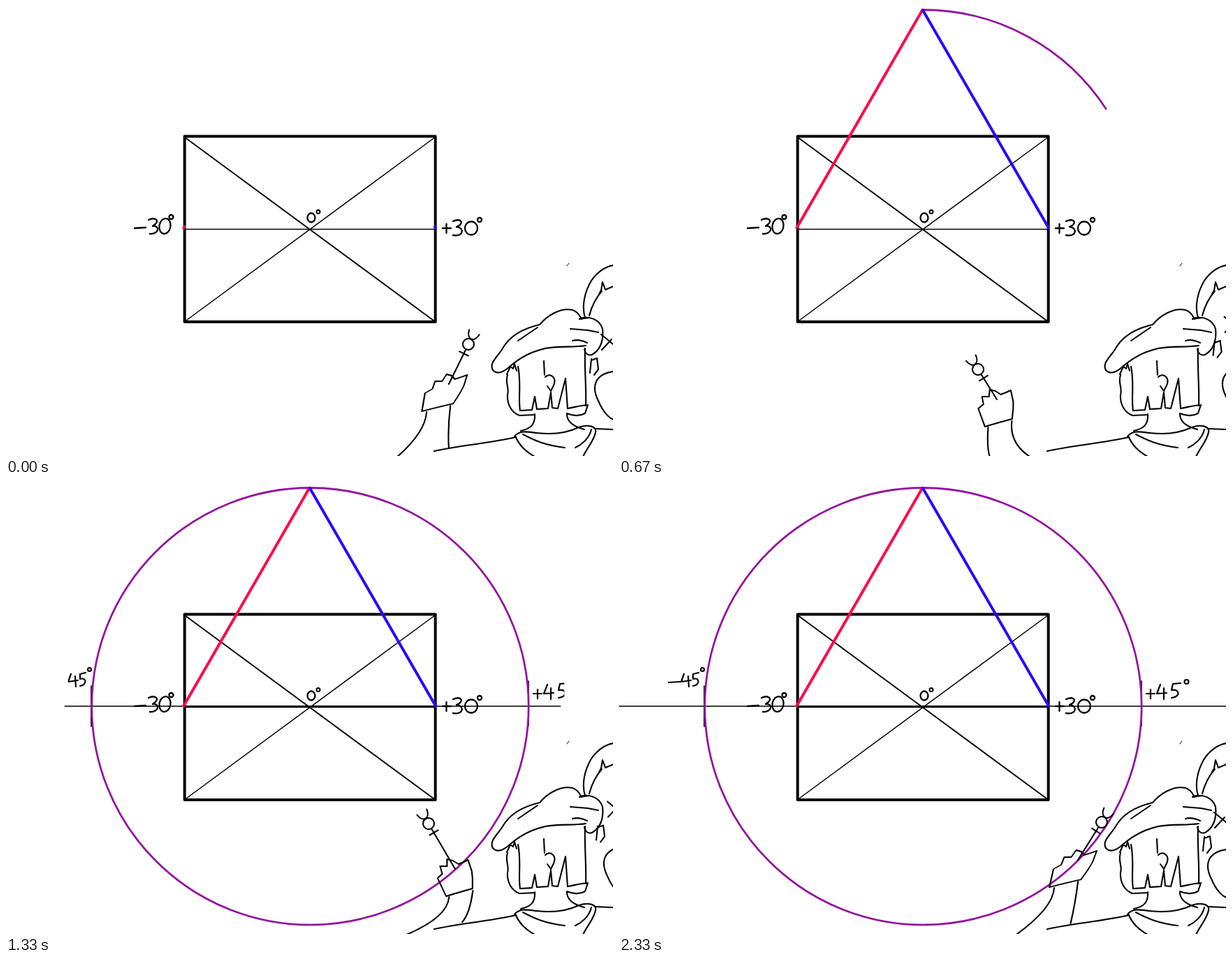
Write an HTML page that moves like this. It is 869x644 px and loops after 2500 ms.

```html
<!DOCTYPE html>
<html lang="en">
<head>
<meta charset="utf-8">
<title>Angles in a circle of view</title>
<style>
  html, body { margin: 0; width: 100%; height: 100%; overflow: hidden; background: #fff; }
  svg { display: block; width: 100%; height: 100%; fill: none; stroke: #000; stroke-linecap: round; stroke-linejoin: round; }
</style>
</head>
<body>
<svg viewBox="0 0 869 644">
  <defs>
    <clipPath id="axisClip"><rect id="axisWipe" y="0" height="644"/></clipPath>
    <clipPath id="labelClip"><rect id="labelWipe" y="0" height="644"/></clipPath>
  </defs>

  <!-- Picture plane -->
  <path stroke-width="1.5" d="M256 451.5 614 188M255 319.5H615"/>
  <path stroke-width="1.9" d="M256 188 614 451.5"/>
  <rect x="255.7" y="186.5" width="359" height="265.5" stroke-width="4"/>
  <g stroke-width="2.3">
    <g aria-label="-30°">
      <path d="M184 318 200 317M204 306C212 302 220 306 214 312L210 315C221 314 219 327 206 326"/>
      <ellipse cx="227.5" cy="315" rx="8" ry="11" transform="rotate(10 227.5 315)"/>
      <circle cx="236.5" cy="302" r="3"/>
    </g>
    <g aria-label="+30°">
      <path d="M625 318H637M630.5 312V325M640 308C649 304 656 308 649 314L645 316C657 317 655 331 640 328"/>
      <ellipse cx="666" cy="318" rx="9" ry="9.5"/>
      <circle cx="678" cy="306" r="3"/>
    </g>
    <g aria-label="0°">
      <ellipse cx="437" cy="303" rx="5.5" ry="6.5"/>
      <circle cx="447" cy="294.5" r="2.5" stroke-width="2"/>
    </g>
  </g>

  <!-- Growing construction -->
  <g clip-path="url(#axisClip)">
    <path stroke-width="1.7" d="M0 318H869M122 289V347M748 282V346"/>
    <path stroke-width="2.8" d="M256 318.5H614"/>
  </g>
  <g clip-path="url(#labelClip)" stroke-width="2.2">
    <g aria-label="-45°">
      <path d="M71 284 87 283M93 272 89 283 103 281M99 275 100 290M114 270 106 272 106 279C116 276 116 288 106 289"/>
      <circle cx="119.5" cy="265.5" r="2.5"/>
    </g>
    <g aria-label="+45°">
      <path d="M755 300H767M761 294V307M775 287 770 300 784 299M780 292V308M804 285 793 286 791 295C802 292 805 305 791 306"/>
      <circle cx="812.5" cy="283" r="3"/>
    </g>
  </g>
  <circle id="ring" pathLength="100" cx="435.5" cy="318.2" r="312.7" transform="rotate(-90 435.5 318.2)"
          stroke="#93169f" stroke-width="2.8" stroke-linecap="butt"/>
  <path id="red" pathLength="100" stroke="#ff0a4b" stroke-width="4" d="M254.5 317.5 434.5 5.5"/>
  <path id="blue" pathLength="100" stroke="#2a08ff" stroke-width="4" d="M615 317.5 435 6"/>

  <!-- Painter seen from behind -->
  <g stroke-width="2.1">
    <path stroke-width="1" d="M803 372 806 368"/>
    <g id="feather">
      <path d="M829 446C824 430 828 410 838 393C848 379 858 373 870 371M835 443C839 428 846 416 853 408M849 412 852 407 854 395 858 406 870 401"/>
    </g>
    <g id="hat">
      <path d="M697 521C691 511 704 502 711 490C722 471 742 461 764 456C774 444 793 431 811 435C820 438 822 445 824 448M733 479 761 460"/>
      <path d="M697 521C703 528 712 524 720 517C737 502 752 495 772 490C792 486 812 489 830 486M822 447C836 443 850 449 854 462C856 480 850 493 839 499C833 501 829 497 828 491"/>
      <path d="M808 462 833 464 848 467M811 479C818 477 826 479 832 482M821 448 835 446"/>
    </g>
    <g id="head">
      <path d="M733 516C738 540 733 560 736 579L753 578 757 559 760 577 776 576 780 553 782 575 790 576 801 533 804 576M829 490C828 520 831 545 830 572"/>
      <path d="M770 508 771 528M772 531C779 524 789 532 784 543L780 551 775 544"/>
      <path d="M717 527 722 516 726 519 728 512 731 522M718 528C714 540 721 546 718 556C717 570 724 582 735 586L757 585M804 576C815 574 825 571 833 571L829 583C820 588 810 586 803 583"/>
    </g>
    <g id="shoulders">
      <path d="M757 584C758 600 750 605 737 608M803 584C803 595 813 602 828 606M845 605 870 606M730 617C690 626 650 629 613 637"/>
      <path d="M728 616C735 606 750 610 760 611C785 614 803 611 820 603C834 598 846 602 844 610C842 622 832 632 826 645M729 615C735 630 745 638 757 645M740 613C757 622 773 629 800 632M838 606C835 619 824 628 815 632"/>
    </g>
    <path id="farHand" d="M852 470 869 484M853 492 867 477M838 505 836 525M838 507 846 504 848 520 842 528"/>
    <path id="farArm" d="M870 523C842 527 838 545 848 565C855 582 864 590 870 592"/>
    <path id="hand" d="M-21 4-28-22-20-28-21-39-11-39-9-49-1-47 6-42 14-45 21-48 23-32 22-22 19-7Q3-3-21 4"/>
    <path id="forearm"/>
    <path id="wand"/>
    <path id="symbol" d="M-8-19C-6-5 6-5 8-19M-8 0A8 8 0 1 1 8 0A8 8 0 1 1-8 0M-7 15H7"/>
  </g>
</svg>
<script>
const el = id => document.getElementById(id);
const set = (id, name, value) => el(id).setAttribute(name, value);
const FPS = 24, LOOP = 2500, DRAWING = 4;

// Path of the wand: where it is gripped and where its round head is.
const keys = [
  { at: 0, grip: [634, 541], head: [662, 484] },
  { at: 8, grip: [578, 558], head: [590, 497] },
  { at: 16, grip: [541, 563], head: [514, 520] },
  { at: 20, grip: [571, 552], head: [513, 508] },
  { at: 32, grip: [643, 551], head: [605, 486] },
  { at: 40, grip: [681, 582], head: [677, 515] },
  { at: 56, grip: [657, 538], head: [691, 484] },
];
keys.push({ ...keys[0], at: 60 });

const ease = (frame, from, to) => {
  const s = Math.min(1, Math.max(0, (frame - from) / (to - from)));
  return s * s * (3 - 2 * s);
};
const mix = (a, b, k) => a.map((v, i) => v + (b[i] - v) * k);

function drawPainter(frame) {
  const next = keys.findIndex(key => key.at > frame), a = keys[next - 1], b = keys[next];
  const k = (frame - a.at) / (b.at - a.at);
  const [gx, gy] = mix(a.grip, b.grip, k), [hx, hy] = mix(a.head, b.head, k);
  const dx = hx - gx, dy = hy - gy, length = Math.hypot(dx, dy);
  set('wand', 'd', `M${gx} ${gy}L${hx - dx * 8 / length} ${hy - dy * 8 / length}`);
  set('symbol', 'transform', `translate(${hx} ${hy}) rotate(${Math.atan2(dx, -dy) * 180 / Math.PI})`);

  // The hand leans with the wand; the forearm trails behind the wrist.
  const lean = 6 + 0.35 * dx, x = gx - lean, y = gy + 35;
  set('hand', 'transform', `matrix(1 0 ${-lean / 36} 1 ${x} ${y})`);
  set('forearm', 'd',
    `M${x - 16} ${y + 5}Q${x - 18} ${y + 34} ${313 + 0.4 * x} 645` +
    `M${x + 18} ${y - 4}Q${x + 14} ${y + 28} ${263 + 0.6 * x} ${744 - 0.18 * x}`);

  const swing = 22 * Math.max(0, Math.sin(Math.PI * frame / 40));
  set('farArm', 'transform', `translate(${swing} ${-swing * 0.3})`);
  set('farHand', 'transform', `translate(${swing * 0.7} ${-swing * 1.2})`);
}

const grow = (id, part) => set(id, 'stroke-dasharray', `${part * 100.2} 200`);
function wipe(id, centre, half) {
  set(id, 'x', centre - half);
  set(id, 'width', 2 * half);
}

function draw() {
  const time = performance.now() % LOOP;
  const frame = Math.floor((time + 4) * FPS / 1000) % 60;
  const sides = ease(frame, -0.5, 10.9);
  grow('red', sides);
  grow('blue', sides);
  grow('ring', ease(frame, 12.86, 25.34));
  const half = 440 * ease(frame, 26.5, 34.15);
  wipe('axisWipe', 439, half);
  wipe('labelWipe', 444, half);
  drawPainter(frame - frame % DRAWING);
  requestAnimationFrame(draw);
}
draw();
</script>
</body>
</html>
```
